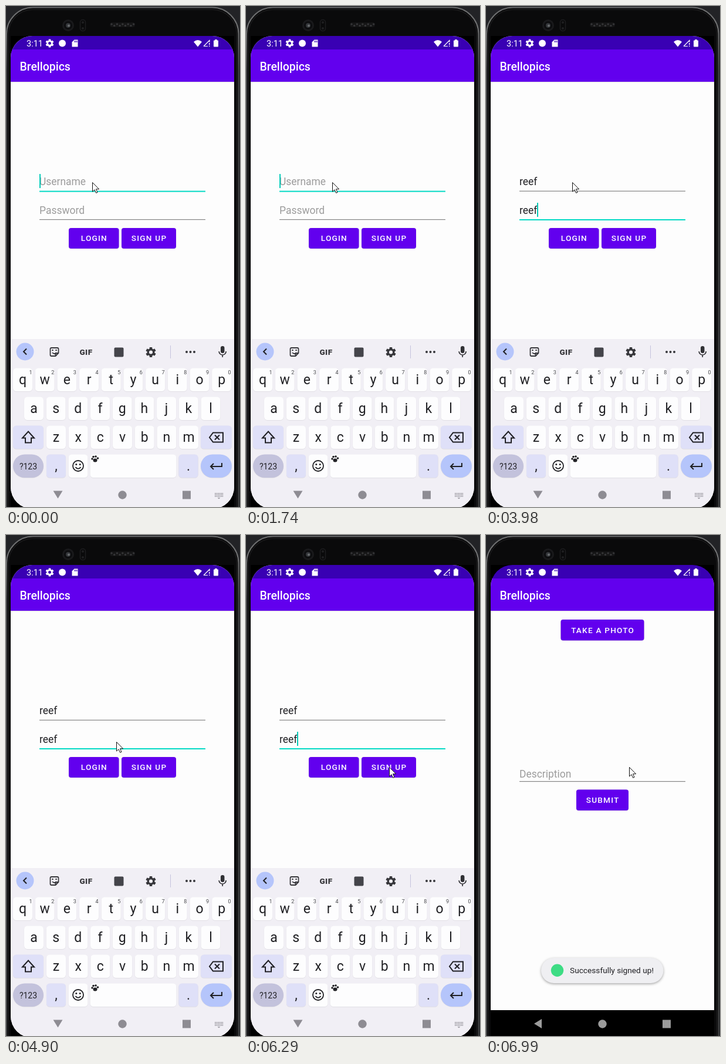
These frames come from a looping animation (399 by 853 pixels, 8000 ms). An HTML page with a canvas:

```html
<!DOCTYPE html>
<html lang="en">
<head>
<meta charset="utf-8">
<title>Sign up flow</title>
<style>
html, body { margin: 0; width: 100%; height: 100%; overflow: hidden; background: #222326; }
canvas { display: block; }
</style>
</head>
<body>
<canvas id="stage" width="399" height="853"></canvas>
<script>
const ctx = document.getElementById('stage').getContext('2d');
const LOOP = 8000;
const PURPLE = '#6200ee', TEAL = '#03dac5', INK = '#202024', HINT = '#9c9c9c';
const CENTER_X = 198.5, CENTER_Y = 453;

// Each track lists [start time, value]; values hold until the next entry.
const tracks = {
  username: [[0, ''], [1890, 're'], [2040, 'ree'], [2190, 'reef']],
  password: [[0, ''], [3700, 're'], [3980, 'reef']],
  caret: [[0, 1], [310, 0], [740, 1], [1270, 0], [1740, 1], [3170, 0], [3700, 1],
    [4480, 0], [5020, 1], [5450, 0], [6020, 1]],
  focus: [[0, 0], [2620, 0.5], [2740, 1]],
  pointer: [[0, [147, 300]], [4630, [154, 295]], [4780, [168, 318]], [4900, [188, 352]],
    [5020, [227, 390]], [5170, [244, 395]]],
  ripple: [[0, [0, 0]], [5450, [0.2, 26]], [5600, [0.24, 70]], [5870, [0.17, 70]],
    [6020, [0.08, 70]], [6290, [0, 0]]],
  lift: [[0, 0], [5450, 1], [5600, 0]],
  opening: [[0, null], [6690, { scale: 0.988, icon: '#484848', turn: 0 }],
    [6840, { scale: 0.997, icon: '#707070', turn: 1.1 }],
    [6990, { scale: 1, icon: '#9c9c9c', turn: Math.PI / 2 }]]
};
const valueAt = (name, t) => tracks[name].filter(step => step[0] <= t).pop()[1];

function rect(x, y, w, h, color) {
  ctx.fillStyle = color;
  ctx.fillRect(x, y, w, h);
}
function round(x, y, w, h, r, color) {
  ctx.beginPath();
  ctx.roundRect(x, y, w, h, r);
  ctx.fillStyle = color;
  ctx.fill();
}
function outline(x, y, w, h, r, color, width) {
  ctx.beginPath();
  ctx.roundRect(x, y, w, h, r);
  ctx.strokeStyle = color;
  ctx.lineWidth = width;
  ctx.stroke();
}
function circle(x, y, r, color) {
  ctx.beginPath();
  ctx.arc(x, y, r, 0, Math.PI * 2);
  ctx.fillStyle = color;
  ctx.fill();
}
function shape(d, x, y, fill, stroke, width = 1.8) {
  ctx.save();
  ctx.translate(x, y);
  const path = new Path2D(d);
  if (fill) { ctx.fillStyle = fill; ctx.fill(path); }
  if (stroke) { ctx.strokeStyle = stroke; ctx.lineWidth = width; ctx.stroke(path); }
  ctx.restore();
}
function text(s, x, y, size, color, { weight = 400, align = 'left', spacing = 0 } = {}) {
  ctx.font = `${weight} ${size}px Roboto, sans-serif`;
  ctx.letterSpacing = spacing + 'px';
  ctx.textAlign = align;
  ctx.fillStyle = color;
  ctx.fillText(s, x, y);
  ctx.letterSpacing = '0px';
}
function shadow(blur, dy, alpha, draw) {
  ctx.save();
  ctx.shadowColor = `rgba(0,0,0,${alpha})`;
  ctx.shadowBlur = blur;
  ctx.shadowOffsetY = dy;
  draw();
  ctx.restore();
}
function gear(x, y, r, color, hole) {
  ctx.save();
  ctx.translate(x, y);
  for (let i = 0; i < 6; i++) {
    rect(-r * 0.25, -r, r * 0.5, r * 2, color);
    ctx.rotate(Math.PI / 3);
  }
  ctx.restore();
  circle(x, y, r * 0.76, color);
  circle(x, y, r * 0.36, hole);
}

function phoneBody() {
  rect(0, 0, 399, 853, '#222326');
  round(0, 2, 397, 900, 46, '#0a0a0b');
  const rim = ctx.createLinearGradient(0, 0, 0, 110);
  rim.addColorStop(0, '#6c6d6e');
  rim.addColorStop(0.35, '#727374');
  rim.addColorStop(1, '#414243');
  outline(1, 2.5, 395.5, 900, 45, rim, 2);
  outline(4, 6, 389.5, 900, 42, '#1c1c1d', 1.5);
  circle(106, 33, 10, '#19191b');
  circle(106, 33, 7, '#0c0c0e');
  circle(106, 33, 4, '#34363a');
  circle(107, 33.5, 2, '#6a6d70');
  outline(126.5, 23.5, 9, 19, 4, '#1d1d1f', 1.5);
  circle(131, 28, 2, '#202022');
  circle(131, 38, 2, '#202022');
  round(177, 28, 43, 8, 4, '#151516');
  for (let i = 0; i < 9; i++) circle(180 + i * 4.7, 31 + i % 2 * 2.5, 1.8, '#343436');
  rect(8, 51, 381, 802, '#000');
}

function statusBar() {
  const bar = '#3900b3';
  rect(8, 51, 381, 28, bar);
  text('3:11', 35, 69, 14.5, '#fff');
  gear(74.5, 63.5, 6.8, '#fff', bar);
  circle(96, 63.5, 6, '#fff');
  shape('M4 0H10V12H0V4Z', 112.5, 57.5, '#fff');
  for (const x of [116.5, 118.5, 120.5]) rect(x, 59, 1, 3, bar);
  shape('M0 3.5Q7 -2.5 14 3.5L7 12Z', 320, 57.5, '#fff');
  shape('M0 10L10 0V3M0 10H7', 337, 58.5, null, '#fff', 1.2);
  rect(346, 63, 1.5, 3, '#fff');
  rect(346, 67.5, 1.5, 1.5, '#fff');
  round(354, 58.5, 8, 11, 1, '#fff');
  rect(356.2, 57, 3.6, 2, '#fff');
}

function appBar() {
  shadow(1.5, 0.5, 0.25, () => rect(8, 74, 381, 55, PURPLE));
  text('Brellopics', 23.5, 109.5, 19.4, '#fff', { weight: 500 });
}

function button(label, x, y, w, h, lift = 0) {
  shadow(lift ? 5 : 1, lift ? 2.5 : 0.3, 0.25, () => round(x, y, w, h, 4, PURPLE));
  text(label, x + w / 2 + 0.6, y + h / 2 + 4.9, 13.6, '#fff',
    { weight: 500, align: 'center', spacing: 1.22 });
}

function field(value, hint, y, lineY, focus, caret) {
  text(value || hint, 57, y, 17.46, value ? INK : HINT);
  const end = 57 + ctx.measureText(value).width;
  ctx.globalAlpha = 1 - focus;
  rect(57, lineY, 283, 1.2, '#858585');
  ctx.globalAlpha = focus;
  rect(57, lineY, 283, 2, TEAL);
  ctx.globalAlpha = 1;
  if (caret) rect(Math.round(end), y - 19, 2, 24, '#05cbb8');
}

function key(x, y, w, label, color = '#fdfdfe', r = 5.5) {
  shadow(1, 0.6, 0.12, () => round(x, y, w, 39.5, r, color));
  if (label) text(label, x + w / 2, y + 27.5, 23, INK, { align: 'center' });
}

function toolbar() {
  circle(32.5, 588.5, 15, '#b5c5fb');
  shape('M3 -5L-2 0L3 5', 32, 588.5, null, INK, 2);
  shape('M-5 -7H5Q7 -7 7 -5V2L2 7H-5Q-7 7 -7 5V-5Q-7 -7 -5 -7ZM7 2H4Q2 2 2 4V7M-3.5 1Q0 5 3 1',
    82.5, 589, null, '#37373b', 1.8);
  circle(79.5, 586, 1.2, INK);
  circle(85.5, 586, 1.2, INK);
  text('GIF', 136.5, 593.5, 13.5, '#37373b', { weight: 900, align: 'center', spacing: 0.5 });
  round(184.5, 581.5, 16, 16, 2, '#44444a');
  gear(247, 589.5, 8.5, '#37373b', '#f1eff5');
  rect(280, 578, 1, 22, '#c5c2de');
  for (const x of [308, 314.5, 321]) circle(x, 589, 2, '#37373b');
  round(366, 579, 6.5, 12, 3.2, '#303034');
  shape('M-6 -1A6 6 0 0 0 6 -1M0 5V9', 369.2, 589, null, '#303034', 1.7);
}

function keyboard() {
  rect(8, 567, 381, 286, '#f1eff5');
  toolbar();
  const pitch = 37.68, tint = '#dfe0f8';
  [...'qwertyuiop'].forEach((c, i) => {
    const x = 12 + i * pitch;
    key(x, 616.5, 33, c);
    text(String((i + 1) % 10), x + 30, 627, 9, '#45454b', { align: 'center' });
  });
  [...'asdfghjkl'].forEach((c, i) => key(31 + i * pitch, 665.5, 33, c));
  [...'zxcvbnm'].forEach((c, i) => key(69 + i * pitch, 714.5, 33, c));

  key(12, 714.5, 52, '', tint);
  shape('M0 -10L10 1H5V9H-5V1H-10Z', 38, 734.5, null, INK, 2);
  key(332, 714.5, 53, '', tint);
  shape('M-12 0L-6 -8H11V8H-6ZM-3 -4L5 4M5 -4L-3 4', 359, 734.5, null, INK, 2);

  key(12, 763.5, 52, '', '#c3c2dc', 20);
  text('?123', 38, 788.5, 14, INK, { align: 'center' });
  key(69, 763.5, 33, ',', tint);
  key(106.5, 763.5, 33, '');
  shape('M9 0A9 9 0 1 1 -9 0A9 9 0 1 1 9 0M-4.6 2.2Q0 7.4 4.6 2.2', 123, 783, null, INK, 1.8);
  circle(119.8, 780.5, 1.5, INK);
  circle(126.2, 780.5, 1.5, INK);
  key(143.5, 763.5, 147, '');
  for (const [x, y] of [[147, 771], [149, 767.5], [153, 767], [156.5, 770]]) circle(x, y, 1.8, INK);
  round(148.5, 770.5, 7, 6, 3, INK);
  key(294.5, 763.5, 33, '.', tint);
  key(332, 763.5, 53, '', '#b5c5fb', 20);
  shape('M10 -5V1H-9M-4 -4L-9 1L-4 6', 358, 783, null, INK, 2);

  navIcons('#8e8c93', 0);
  for (let row = 0; row < 3; row++)
    for (let i = 0; i < 6; i++) rect(356 + i * 2.5, 829 + row * 2.5, 1.7, 1.7, '#a09ea5');
  shape('M0 0H5L2.5 2.5Z', 360.5, 837, '#a09ea5');
}

function navIcons(color, turn) {
  ctx.save();
  ctx.translate(88.5, 832);
  ctx.rotate(turn);
  shape('M-8 -6.5H8L0 6.5Z', 0, 0, color);
  ctx.restore();
  circle(198.5, 832.5, 7.2, color);
  rect(301, 825.5, 14, 14, color);
}

function signUpScreen(t) {
  const focus = valueAt('focus', t), caret = valueAt('caret', t);
  appBar();
  field(valueAt('username', t), 'Username', 305, 314.6, 1 - focus, caret && focus === 0);
  field(valueAt('password', t), 'Password', 354, 363, focus, caret && focus > 0);
  button('LOGIN', 107, 378, 85.5, 35);
  button('SIGN UP', 197, 378, 93, 35, valueAt('lift', t));
  const [alpha, radius] = valueAt('ripple', t);
  if (alpha) {
    ctx.save();
    ctx.beginPath();
    ctx.roundRect(197, 378, 93, 35, 4);
    ctx.clip();
    rect(197, 378, 93, 35, `rgba(255,255,255,${alpha / 2})`);
    circle(244, 395, radius, `rgba(255,255,255,${alpha / 2})`);
    ctx.restore();
  }
  keyboard();
}

function postScreen({ scale, icon, turn }) {
  if (scale < 1) {
    rect(8, 79, 381, 34, '#1a0048');
    rect(8, 113, 381, 460, '#b2b2b4');
    rect(8, 573, 381, 258, '#d5d4df');
  }
  ctx.save();
  ctx.translate(CENTER_X, CENTER_Y);
  ctx.scale(scale, scale);
  ctx.translate(-CENTER_X, -CENTER_Y);
  rect(8, 74, 381, 735, '#fdfdfd');
  appBar();
  button('TAKE A PHOTO', 127.5, 144, 142, 35.5);
  text('Description', 57, 412.5, 17.46, HINT);
  rect(57, 419, 283, 1.2, '#858585');
  button('SUBMIT', 154, 433.5, 89, 35.5);
  rect(8, 809, 381, 50, '#000');
  ctx.restore();
  navIcons(icon, turn);
}

function toast() {
  shadow(4, 1.5, 0.35, () => round(94, 720, 208.5, 43, 21.5, '#efeff2'));
  circle(121.5, 741.3, 10.7, '#3ddc84');
  text('Successfully signed up!', 143, 746.2, 13.7, INK);
}

function pointer([x, y]) {
  shape('M0.5 0.5V16L4 12.8L6.6 18.4L9 17.3L6.5 11.8H11.6Z', x, y, '#fff', '#111', 1);
}

function draw(t) {
  const opening = valueAt('opening', t);
  phoneBody();
  ctx.save();
  ctx.beginPath();
  ctx.roundRect(8, 51, 381, 805, 37);
  ctx.clip();
  rect(8, 51, 381, 805, opening ? '#000' : '#fdfdfd');
  statusBar();
  if (opening) postScreen(opening);
  else signUpScreen(t);
  ctx.restore();
  if (opening) toast();
  pointer(valueAt('pointer', t));
}

const start = performance.now();
function tick() {
  draw((performance.now() - start) % LOOP);
  requestAnimationFrame(tick);
}
tick();
</script>
</body>
</html>
```
